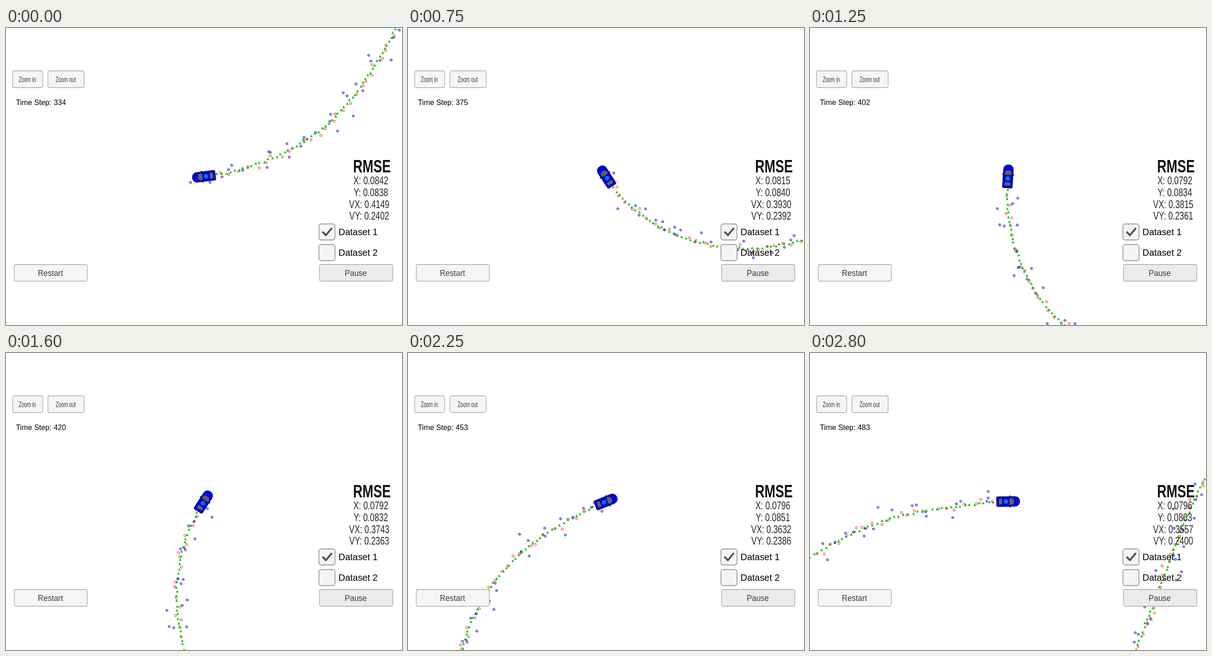
Recreate the animation shown at these times as an HTML page with a canvas. Size 864 px wide and 648 px high, loop 2900 ms.

```html
<!DOCTYPE html>
<html lang="en">
<head>
<meta charset="utf-8">
<title>Tracking simulator</title>
<style>
  html, body { margin: 0; width: 100%; height: 100%; overflow: hidden; background: #fff; }
  canvas { display: block; }
</style>
</head>
<body>
<canvas id="stage" width="864" height="648"></canvas>
<script>
const ctx = document.getElementById('stage').getContext('2d');
const FONT = '"Liberation Sans", Arial, sans-serif';
const LOOP = 2900, TICK = 50, LAST_TICK = 2800;
const CENTER = { x: 432, y: 324 };

// Drive: time step, world x, world y, heading in degrees
const route = [
  [212, 1096, -585, 122], [233, 1009, -399, 109], [257, 926, -182, 112],
  [277, 850, 3, 119], [312, 634, 258, 151], [334, 432, 324, 173],
  [352, 257, 304.5, 197], [375, 82, 170.5, 237], [402, 22, -80, 274],
  [440, 223, -387, 328], [466, 470.6, -483.5, 352], [483, 647, -503, 359]
];

// Readout: ms, time step, RMSE of X, Y, VX, VY
const readout = [
  [0, 334, .0842, .0838, .4149, .2402], [300, 352, .0824, .0857, .4046, .2355],
  [750, 375, .0815, .0840, .3930, .2392], [1250, 402, .0792, .0834, .3815, .2361],
  [2000, 440, .0791, .0830, .3661, .2365], [2500, 466, .0802, .0872, .3604, .2408],
  [2800, 483, .0796, .0863, .3557, .2400]
];

// Each sensor: steps between readings, spread of the noise in pixels
const sensors = {
  estimate: { every: 1, spread: 2.5 },
  lidar: { every: 2, spread: 11 },
  radar: { every: 2, spread: 36 }
};

const segmentAt = (rows, value) => {
  let i = 0;
  while (i < rows.length - 2 && rows[i + 1][0] <= value) i++;
  const [a, b] = [rows[i], rows[i + 1]];
  return { a, b, u: (value - a[0]) / (b[0] - a[0]) };
};

// Cubic Hermite curve through the route
function pose(step) {
  const { a, b, u } = segmentAt(route, step);
  const pull = Math.hypot(b[1] - a[1], b[2] - a[2]) * 1.04;
  const axis = (k, trig) => {
    const t0 = trig(a[3] * Math.PI / 180) * pull, t1 = trig(b[3] * Math.PI / 180) * pull;
    const d = b[k] - a[k], c2 = 3 * d - 2 * t0 - t1, c3 = t0 + t1 - 2 * d;
    return [a[k] + u * (t0 + u * (c2 + u * c3)), t0 + u * (2 * c2 + 3 * u * c3)];
  };
  const [x, dx] = axis(1, Math.cos), [y, dy] = axis(2, Math.sin);
  return { x, y, angle: Math.atan2(dy, dx) };
}

let seed = 7;
const random = () => (seed = seed * 16807 % 2147483647) / 2147483647;
const noise = spread => (random() + random() - 1) * spread;

function buildMarkers() {
  const markers = [], last = route[route.length - 1][0];
  for (let step = route[0][0]; step <= last; step++) {
    const p = pose(step);
    for (const [kind, { every, spread }] of Object.entries(sensors)) {
      if (step % every === 0) markers.push({ kind, step, x: p.x + noise(spread), y: p.y + noise(spread) });
    }
  }
  return markers;
}
const markers = buildMarkers();

function ring(x, y, color) {
  ctx.strokeStyle = color;
  ctx.lineWidth = 1;
  ctx.beginPath();
  ctx.arc(x, y, 2.4, 0, 7);
  ctx.stroke();
}

const drawMarker = {
  estimate(x, y) {
    ctx.fillStyle = '#00c800';
    ctx.beginPath();
    ctx.moveTo(x, y - 3);
    ctx.lineTo(x + 2.9, y + 2.6);
    ctx.lineTo(x - 2.9, y + 2.6);
    ctx.fill();
  },
  lidar(x, y) { ring(x, y, '#f00'); },
  radar(x, y) {
    ring(x, y, '#0000d0');
    ctx.beginPath();
    ctx.moveTo(x - 1.6, y - 1);
    ctx.lineTo(x + 1.4, y + .8);
    ctx.stroke();
  }
};

function box(x, y, w, h, r, fill, stroke, line = 1) {
  ctx.beginPath();
  ctx.roundRect(x, y, w, h, r);
  ctx.fillStyle = fill;
  ctx.fill();
  ctx.strokeStyle = stroke;
  ctx.lineWidth = line;
  ctx.stroke();
}

function drawCar(angle) {
  ctx.save();
  ctx.translate(CENTER.x, CENTER.y);
  ctx.rotate(angle);
  ctx.fillStyle = '#000070';
  ctx.fillRect(3, -13, 2.5, 26);
  box(-25, -10.8, 50.5, 21.6, [3, 10, 10, 3], '#0000e6', '#000060');
  ctx.strokeStyle = '#000090';
  ctx.beginPath();
  for (const side of [-1, 1]) {
    ctx.moveTo(-21, side * 8.5);
    ctx.lineTo(6, side * 8.5);
  }
  ctx.stroke();
  box(-20, -6.5, 7.5, 13, 1.5, '#666', '#202040', .8);
  box(3, -7.8, 10.5, 15.6, [3, 6, 6, 3], '#606060', '#202040', .8);
  ctx.fillStyle = '#1070e0';
  ctx.beginPath();
  ctx.arc(-4.5, 0, 5, 0, 7);
  ctx.fill();
  ctx.restore();
}

function label(text, x, baseline, size, { color = '#000', align = 'center', squeeze = 1, weight = '' } = {}) {
  ctx.save();
  ctx.translate(x, baseline);
  ctx.scale(squeeze, 1);
  ctx.font = `${weight} ${size}px ${FONT}`;
  ctx.textAlign = align;
  ctx.fillStyle = color;
  ctx.fillText(text, 0, 0);
  ctx.restore();
}

function button(text, x, y, w, size, squeeze, fill = '#f5f5f5') {
  box(x + .5, y + .5, w, 36.5, 3.5, fill, '#a6a6a6', 1.3);
  label(text, x + w / 2 - .3, y + 25, size, { color: '#3c3c3c', squeeze });
}

function checkbox(text, y, checked) {
  box(682.8, y, 35, 35, 5, '#f4f4f4', '#9a9a9a', 1.8);
  if (checked) {
    ctx.strokeStyle = '#505050';
    ctx.lineWidth = 4;
    ctx.beginPath();
    ctx.moveTo(690.5, y + 17);
    ctx.lineTo(698, y + 24.5);
    ctx.lineTo(711, y + 9);
    ctx.stroke();
  }
  label(text, 725.5, y + 24, 21, { align: 'left', squeeze: .95 });
}

function drawPanel(step, errors) {
  button('Zoom in', 14, 93, 65.5, 16.5, .63);
  button('Zoom out', 91, 93, 79, 16.5, .63);
  label(`Time Step: ${step}`, 21.5, 167.7, 17, { align: 'left', squeeze: .955 });
  label('RMSE', 798.3, 315, 38, { weight: 'bold', squeeze: .75, color: '#111' });
  ['X', 'Y', 'VX', 'VY'].forEach((name, i) =>
    label(`${name}: ${errors[i].toFixed(4)}`, i < 2 ? 796 : 792.5, 341 + i * 25.8, 24, { color: '#262626', squeeze: .74 }));
  checkbox('Dataset 1', 427.5, true);
  checkbox('Dataset 2', 472.5, false);
  button('Restart', 17.5, 515.5, 159.5, 18, .945);
  button('Pause', 683.5, 515.5, 160, 18, .945, '#ebebeb');
}

function draw() {
  const ms = Math.min(LAST_TICK, Math.floor(performance.now() % LOOP / TICK) * TICK);
  const { a, b, u } = segmentAt(readout, ms);
  const [step, ...errors] = a.slice(1).map((v, i) => v + (b[i + 1] - v) * u);
  const now = Math.round(step), car = pose(now);

  ctx.fillStyle = '#fff';
  ctx.fillRect(0, 0, 864, 648);
  for (const m of markers) {
    if (m.step <= now) drawMarker[m.kind](m.x - car.x + CENTER.x, m.y - car.y + CENTER.y);
  }
  drawCar(car.angle);
  drawPanel(now, errors);
  requestAnimationFrame(draw);
}
draw();
</script>
</body>
</html>
```
